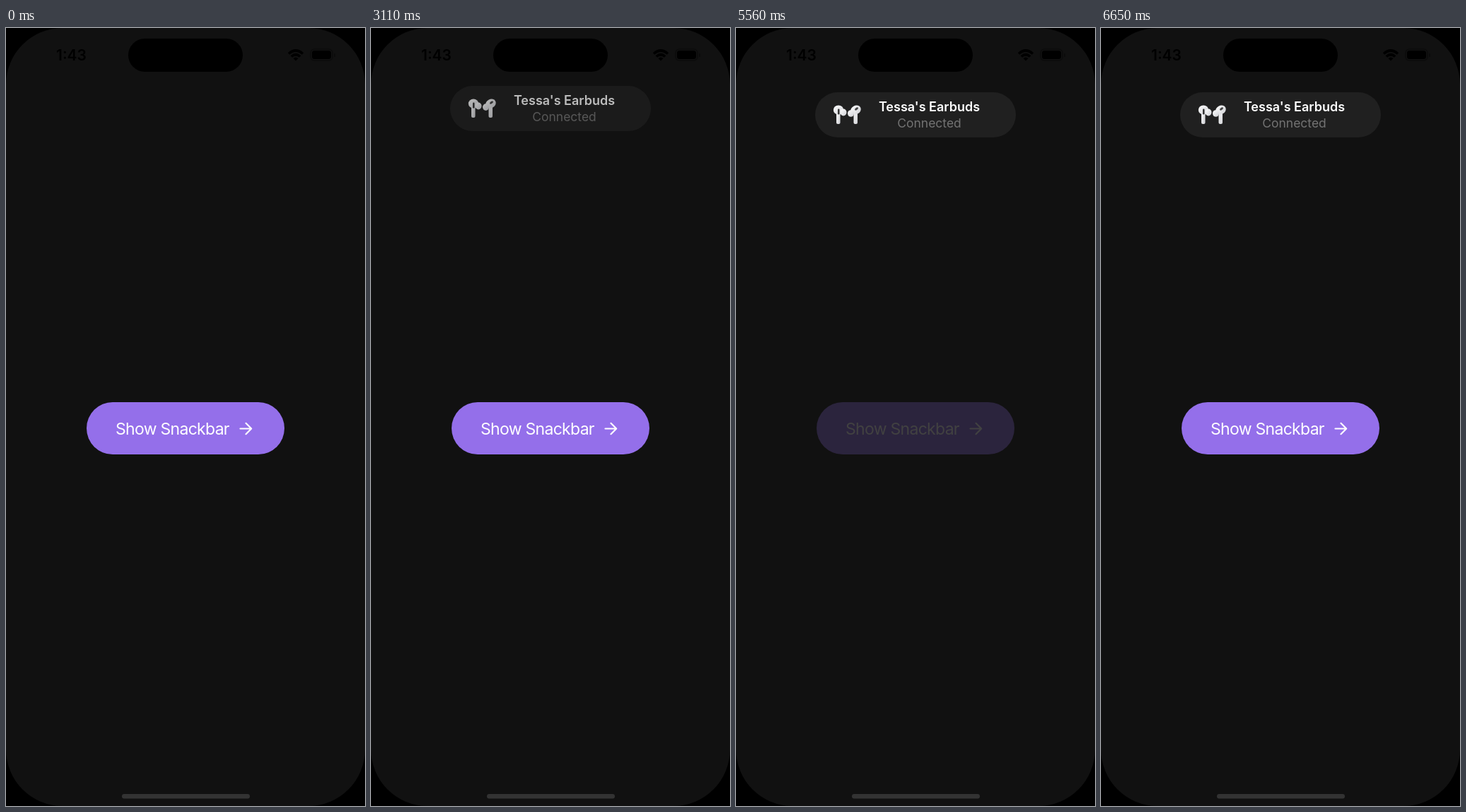
An HTML page that plays this animation: 508 by 1102 pixels, repeating every 6710 ms.

```html
<!DOCTYPE html>
<html lang="en">
<head>
<meta charset="utf-8">
<title>Snackbar</title>
<style>
  html, body { margin: 0; width: 100%; height: 100%; overflow: hidden; background: #000; }
  svg { display: block; width: 508px; height: 1102px; font-family: Inter, sans-serif; }
</style>
</head>
<body>
<svg viewBox="0 0 508 1102">
  <defs>
    <linearGradient id="shell" x2="1" y2="1">
      <stop stop-color="#fff"/><stop offset="1" stop-color="#cfd0d4"/>
    </linearGradient>
    <g id="toast">
      <rect x="112" y="91" width="284" height="64" rx="32" fill="#202020"/>
      <g fill="url(#shell)">
        <rect x="142" y="114" width="5.5" height="22" rx="2"/>
        <ellipse cx="145" cy="116" rx="7.2" ry="6.6"/>
        <ellipse cx="152" cy="119.5" rx="4.5" ry="5"/>
        <rect x="166.5" y="114" width="5.5" height="22" rx="2"/>
        <ellipse cx="169.5" cy="116" rx="7.5" ry="6.2" transform="rotate(-25 169.5 116)"/>
        <ellipse cx="162.5" cy="121" rx="4.5" ry="4.8"/>
      </g>
      <rect x="144" y="114.5" width="2.5" height="8" rx="1.2" fill="#333"/>
      <ellipse cx="170.5" cy="114.5" rx="2.8" ry="1.5" fill="#444" transform="rotate(-35 170.5 114.5)"/>
      <g text-anchor="middle">
        <text x="273.5" y="118" font-size="18" font-weight="600" fill="#fff">Tessa's Earbuds</text>
        <text x="273.5" y="141" font-size="17.5" fill="#737373">Connected</text>
      </g>
    </g>
  </defs>

  <rect width="508" height="1102" rx="80" fill="#111"/>
  <rect x="173" y="15" width="162" height="47" rx="23.5"/>
  <text x="92.5" y="45.5" font-size="21" font-weight="600" text-anchor="middle">1:43</text>
  <g fill="none" stroke="#000" stroke-width="3.6">
    <path d="M400 36.500Q410 27.500 420 36.500M403.800 40.500Q410 35 416.200 40.500"/>
  </g>
  <path d="M406.500 43Q410 40 413.500 43L410 46.500Z"/>
  <rect x="431" y="30" width="31" height="16" rx="5" fill="none" stroke="#0b0b0b" stroke-width="1.300"/>
  <rect x="433" y="32" width="27" height="12" rx="3.500"/>
  <rect x="464" y="36" width="2" height="5" rx="1" fill="#0b0b0b"/>
  <rect x="164" y="1085" width="181" height="6.500" rx="3.250" fill="#333"/>

  <g id="button">
    <rect x="114" y="530" width="280" height="74" rx="37" fill="#946fea"/>
    <text x="155" y="575.500" font-size="23" letter-spacing="-0.7" fill="#fff">Show Snackbar</text>
    <path d="M331.500 567.500H347M339.500 559.800L347.200 567.500L339.500 575.200" fill="none"
      stroke="#fff" stroke-width="2.200" stroke-linecap="round" stroke-linejoin="round"/>
  </g>
  <g id="toasts"></g>
</svg>
<script>
  const LOOP = 6710, SLIDE = 32, TOAST_MS = 300, FADE_MS = 250, MIN_PRESS = 130;
  const presses = [950, 3550, 5550, 5870, 6185];
  // [shown at, dismissed at]
  const toasts = [[1040, 2998], [3660, 5610], [5610, 5930], [5930, 6228], [6228, Infinity]];
  // Screen refreshes: [first, last, count]
  const refreshes = [[0, 0, 1], [960, 960, 1], [1110, 1330, 4], [3110, 3330, 4],
    [3560, 3970, 6], [5560, 6190, 9], [6280, 6650, 6]];

  const button = document.getElementById("button");
  const layer = document.getElementById("toasts");
  const views = toasts.map(() => {
    const view = document.createElementNS("http://www.w3.org/2000/svg", "use");
    view.setAttribute("href", "#toast");
    return layer.appendChild(view);
  });

  const clamp = x => Math.min(1, Math.max(0, x));
  const ease = x => x < 0.5 ? 2 * x * x : 1 - 2 * (1 - x) ** 2;
  const progress = (t, start, duration) => ease(clamp((t - start) / duration));

  function lastRefresh(t) {
    const [first, last, count] = refreshes.findLast(group => group[0] <= t);
    if (count === 1) return first;
    const step = (last - first) / (count - 1);
    return first + Math.min(count - 1, Math.floor((t - first) / step + 1e-6)) * step;
  }

  function render(now) {
    const t = lastRefresh(now % LOOP);
    const press = presses.findLast(p => p <= t);
    const lit = press === undefined ? 1 : progress(t, press + MIN_PRESS, FADE_MS);
    button.setAttribute("opacity", 0.2 + 0.8 * lit);

    toasts.forEach(([shown, dismissed], i) => {
      const visible = t < dismissed
        ? progress(t, shown, TOAST_MS)
        : 1 - progress(t, dismissed, TOAST_MS);
      views[i].setAttribute("opacity", visible);
      views[i].setAttribute("y", SLIDE * (visible - 1));
    });
  }

  const start = performance.now();
  function tick() {
    render(performance.now() - start);
    requestAnimationFrame(tick);
  }
  tick();
</script>
</body>
</html>
```
